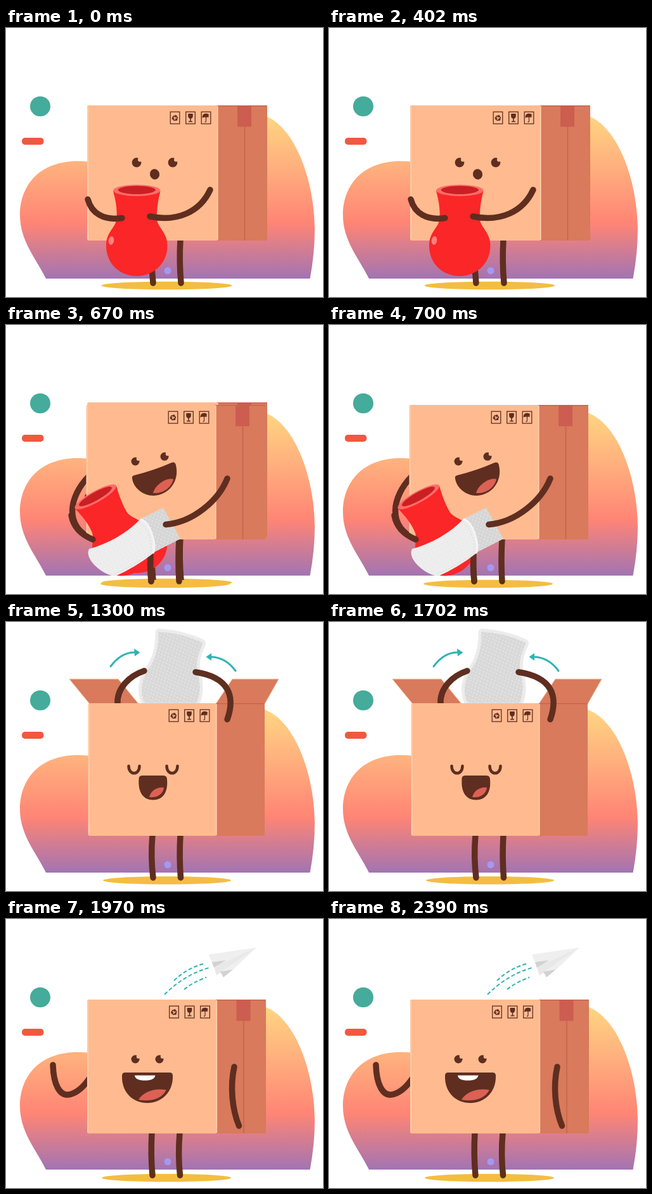
Recreate the animation shown at these times as an HTML page. Size 500x424 px, loop 2.67 s.

```html
<!DOCTYPE html>
<html lang="en">
<head>
<meta charset="utf-8">
<title>Parcel packing a vase</title>
<style>
html, body { margin: 0; width: 100%; height: 100%; overflow: hidden; background: #fff; }
svg { display: block; width: 100vw; height: 100vh; }
.limb { fill: none; stroke: #5f2e20; stroke-width: 9.5; stroke-linecap: round; }
.dark { fill: #5f2e20; }
.tongue { fill: #dc6154; }
.teal { fill: none; stroke: #2fb3b5; }
</style>
</head>
<body>
<svg id="stage" viewBox="0 0 500 424" xmlns="http://www.w3.org/2000/svg"></svg>
<script>
const LOOP = 2670;
const stage = document.getElementById('stage');

const path = (d, attrs) => `<path d="${d}" ${attrs}/>`;
const limb = (...ds) => ds.map(d => path(d, 'class="limb"')).join('');
const dark = d => path(d, 'class="dark"');
const tongue = d => path(d, 'class="tongue"');
const oval = (x, y, rx, ry, fill) => `<ellipse cx="${x}" cy="${y}" rx="${rx}" ry="${ry}" fill="${fill}"/>`;
const rect = (x, y, w, h, fill, r = 0) =>
  `<rect x="${x}" y="${y}" width="${w}" height="${h}" rx="${r}" fill="${fill}"/>`;
const shadow = (x, y, rx) => oval(x, y, rx, 6.3, '#f4bd42');
const eye = (x, y, r) => oval(x, y, r, r, '#5f2e20') + oval(x + r * .72, y - r * .62, r * .45, r * .45, '#ffbb8f');

// Recycling, fragile and keep-dry signs
function signs(x, y) {
  const frame = i => `<rect x="${x + 24.5 * i + .7}" y="${y + .7}" width="14.6" height="18.8" fill="none" stroke="#5f2e20" stroke-width="1.3"/>`;
  const arrow = a => `<g transform="rotate(${a})"><path d="M-4.4 1.2L-2.3-3H.4" fill="none" stroke="#5f2e20" stroke-width="1.7"/><path d="M-.2-5.3L3.2-2.6L-.2-.6Z" class="dark"/></g>`;
  return [0, 1, 2].map(frame).join('') +
    `<g transform="translate(${x + 8} ${y + 10.5})">${[0, 120, 240].map(arrow).join('')}</g>` +
    `<g transform="translate(${x + 32.5} ${y})">` +
      dark('M-3.6 3.5H3.6C4.3 8 3.6 10.5.8 11.3V15.3H3V16.8H-3V15.3H-.8V11.3C-3.6 10.5-4.3 8-3.6 3.5Z') + '</g>' +
    `<g transform="translate(${x + 57} ${y})">` +
      dark('M-6 10C-5.5 2-.8 4 0 3C.8 4 5.5 2 6 10Q4-.0 4 9.4Q2 8.4 0 9.6Q-2 8.4-4 9.6Z') +
      path('M0 8V15.2Q0 17-2 16.4', 'fill="none" stroke="#5f2e20" stroke-width="1.2"') + '</g>';
}

function box(left, fold, right, top, bottom, sealed = true) {
  const h = bottom - top, tape = fold + 31;
  const seal = rect(tape, top, 22, 33.5, '#cc5d50') + rect(tape + 10.8, top + 33, 1.4, h - 33, '#c7614f');
  return rect(fold - 6, top, right - fold + 6, h, '#d87a5b', 2) +
    rect(fold, top, right - fold, 1.3, '#cc5d50') +
    (sealed ? seal : '') +
    rect(left, top, fold - left, h, '#ffbb8f', 2.5) +
    rect(left + .6, top + 2, 1.4, h - 4, '#ffd3b4') +
    rect(fold - 1, top + 1, 1.6, h - 2, '#ffd0ae') +
    signs(fold - 75.5, top + 9.5);
}

const vase =
  path('M169 257C174 275 176 291 174 304C170 317 158 323 158 343C158 372 180 391 206 391C232 391 254.5 372 254.5 343C254.5 323 241 316 238 303C237 290 240 270 243.5 257Z', 'fill="#fa2628"') +
  oval(206.3, 256, 37.2, 9, '#ff6c68') + oval(206.3, 255.3, 29.5, 6.6, '#cb1f23') +
  `<g transform="rotate(8 166 335)">${oval(166, 335, 4.3, 6.7, '#ff8080')}</g>`;

const wrap = (d, fill, extra = '') =>
  path(d, `fill="${fill}" ${extra}`) + path(d, 'fill="url(#bubbles)"');

function holding() {
  return shadow(253.5, 406, 103) +
    limb('M230 378Q231 390 232 402', 'M275 334Q273 368 276 402') +
    box(128, 334, 412, 122, 335) +
    eye(206, 212, 7.4) + eye(263, 212, 7.4) +
    `<g transform="rotate(-15 234.5 230.5)">${oval(234.5, 230.5, 7.5, 8.3, '#5f2e20')}</g>` +
    vase +
    limb('M129 270C135 292 154 304 183 299.5', 'M227 297C270 306 306 290 322 255');
}

function wrapping() {
  const sheet = 'M131 353C160 345 190 329 212 306C227 310 238 345 232 360Q204 382 172 396C150 393 123 368 131 353Z';
  return shadow(251, 408, 102) +
    limb('M130 239C100 270 90 317 137 338', 'M228 337Q226 372 229 404', 'M273 337Q271 372 273 404') +
    box(126.5, 331, 409, 126, 338) +
    eye(204, 215, 6.5) + eye(250, 207.3, 6.5) +
    dark('M202 237Q234 229 261 217Q267 215 268 221C274 246 257 268 233 269C215 269 201 256 199 242Q198 238 202 237Z') +
    tongue('M232 265C235 252 253 240 264 243C261 257 247 266 232 265Z') +
    `<g transform="translate(141 271) rotate(-29) translate(-206 -256)">${vase}</g>` +
    limb('M228 362Q227 383 229 404') +
    wrap('M211 306L248 288L275 337L230 360Z', '#d5d5d5') +
    wrap(sheet, '#eeeeee') +
    path('M212 306C227 310 238 345 232 360', 'fill="none" stroke="#f5f5f5" stroke-width="3"') +
    path('M209 310C224 318 232 345 228 360Q200 380 171 392', 'fill="none" stroke="#dadada" stroke-width="1" stroke-dasharray="3 2"') +
    limb('M103 300C106 317 117 330 137 338', 'M252 314.5C295 311 335 277 349 242');
}

function loading() {
  const flap = d => path(d, 'fill="#d87a5b" stroke="#f3b591" stroke-width="1"');
  const arrow = (d, head) => path(d, 'class="teal" stroke-width="3" stroke-linecap="round"') + path(head, 'fill="#2fb3b5"');
  const closedEye = x => path(`M${x - 8.5} 227C${x - 8.5} 242 ${x + 8.5} 242 ${x + 8.5} 227`,
    'class="limb" style="stroke-width:4.5"');
  return shadow(254, 407.3, 101) +
    limb('M231 336Q228 370 232 403', 'M275 336Q273 370 275.5 403') +
    flap('M100 90H177L209 129H132Z') + flap('M357 90H430L408 129H331Z') +
    wrap('M238 16Q239 12 244 13Q280 16 309 29Q314 31 312 36C304 54 301 66 305 80C309 98 310 110 303 130H217C208 112 210 91 222 74C234 57 238 41 238 16Z',
      '#d8d8d8', 'stroke="#ececec" stroke-width="5"') +
    limb('M176 130C174 105 194 85 218 77') +
    box(129.5, 332, 408, 128, 337, false) +
    limb('M299 79C352 87 362 117 349 153.5') +
    arrow('M165 70Q182 47 204 48', 'M202 42L211.5 48L203 54Z') +
    arrow('M362 77Q346 55 322 55', 'M324 49L315.5 55L324 61Z') +
    closedEye(202) + closedEye(262) +
    dark('M209.5 248Q209 242 215 242H248Q254 242 254 248C256 269 247 280.5 232 280.5C217 280.5 208 269 209.5 248Z') +
    tongue('M226 276C228 266 239 259 249 261C248 271 238 278 226 276Z');
}

function sending() {
  const trail = d => path(d, 'class="teal" stroke-width="2" stroke-dasharray="6 3.5"');
  return shadow(253, 408, 102) +
    limb('M74 230C75 262 85 278 98 277C112 275 122 265 131 252',
      'M230 337Q228 372 231 404', 'M274 337Q271 372 274.5 404') +
    box(128, 332.5, 410, 127, 338) +
    limb('M360 233C353 265 357 301 367.5 326') +
    eye(204, 221, 6.5) + eye(242, 221, 6.5) +
    dark('M183 247Q183 242 188 242H258Q263 242 263 247C264 273 245 290 223 290C200 290 182 273 183 247Z') +
    path('M203 246.5H235.500Q234 254.500 219 254.500Q204 254.500 203 246.500Z', 'fill="#fff"') +
    tongue('M209 285C216 272 236 266 253 269.500C245 284 229 288 209 285Z') +
    trail('M250 119Q281 88 320 77') + trail('M265 97Q286 77 314 70') + trail('M281 111Q296 99 316 92') +
    path('M320 56L395 45L328 77Z', 'fill="#efefef"') +
    path('M325 68L347 65L328 77Z', 'fill="#d2d2d2"') +
    path('M328 76L395 45L332 89Z', 'fill="#e8e8e8"') +
    path('M341 82L395 45L358 80Z', 'fill="#efefef"') +
    path('M338 83L358 79.500L343 92Z', 'fill="#d2d2d2"');
}

const backdrop = `
  <defs>
    <linearGradient id="dusk" gradientUnits="userSpaceOnUse" x1="0" y1="135" x2="0" y2="395">
      <stop offset="0" stop-color="#ffd781"/><stop offset=".3" stop-color="#ffb27e"/>
      <stop offset=".66" stop-color="#ff8575"/><stop offset="1" stop-color="#a274b2"/>
    </linearGradient>
    <pattern id="bubbles" width="7" height="8" patternUnits="userSpaceOnUse" patternTransform="rotate(-25)">
      <g fill="#fff" fill-opacity=".28" stroke="#bbb" stroke-opacity=".28" stroke-width=".6">
        <circle cx="2" cy="2" r="1.9"/><circle cx="5.5" cy="6" r="1.900"/>
      </g>
    </pattern>
  </defs>` +
  path('M63 395C48 364 22 336 22 295C22 244 58 204 128 210.500C240 218 300 120 400 136C455 147 487 242 487 317Q487 355 479.500 395Z', 'fill="url(#dusk)"') +
  oval(54, 123.5, 16, 15.8, '#45ab9b') +
  rect(25, 173, 34.5, 11, '#f2583f', 5) +
  oval(255, 382.5, 5.5, 5.5, '#a498f4');

// Each pose is on stage from start to end (ms); the first two overlap briefly.
const poses = [
  [holding, 0, 700],
  [wrapping, 670, 1300],
  [loading, 1300, 1970],
  [sending, 1970, LOOP],
];

stage.innerHTML = backdrop + poses.map(([draw]) => `<g>${draw()}</g>`).join('');

const groups = stage.querySelectorAll(':scope > g');
poses.forEach(([, start, end], i) => {
  const key = (opacity, ms) => ({ opacity, offset: ms / LOOP, easing: 'step-end' });
  const anim = groups[i].animate([key(0, 0), key(1, start), key(0, end), key(0, LOOP)],
    { duration: LOOP, iterations: Infinity });
  anim.startTime = 0;
});
</script>
</body>
</html>
```
